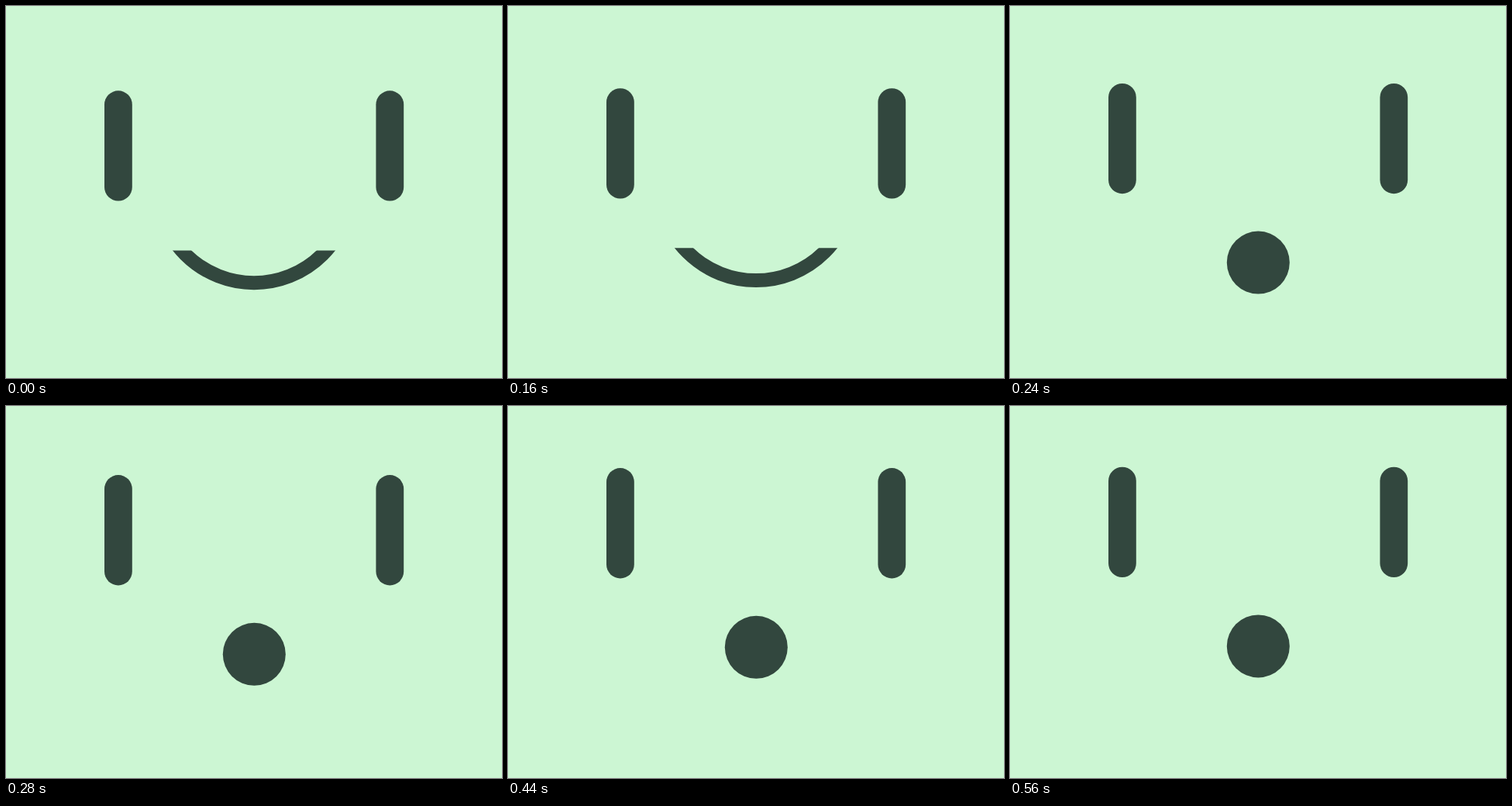
Write an HTML page that moves like this. It is 640 by 480 pixels and loops after 8 s.

```html
<!DOCTYPE html>
<html lang="en">
<head>
<meta charset="utf-8">
<title>Surprised face</title>
<style>
  html, body { margin: 0; height: 100%; overflow: hidden; background: #ccf6d3; }
  svg { display: block; width: 640px; height: 480px; fill: #32473e; }
</style>
</head>
<body>
<svg viewBox="0 0 640 480">
  <clipPath id="below"><rect x="160" y="284.8" width="320" height="100"/></clipPath>
  <g id="face">
    <rect x="127" y="78.7" width="35.8" height="142.3" rx="17.9"/>
    <rect x="477.4" y="78.7" width="35.8" height="142.3" rx="17.9"/>
    <g id="smile" clip-path="url(#below)">
      <circle cx="320" cy="201.6" r="125" fill="none" stroke="#32473e" stroke-width="18"/>
    </g>
    <circle id="gasp" cx="320.3" cy="309.9" r="40.5"/>
  </g>
</svg>
<script>
const LOOP = 8000, STEP = 40, GASP_AT = 240;
// Distance below the resting pose at each step: a steep ease in and a long ease out.
const drop = [30.6, 30.4, 30.1, 29.2, 27.5, 25.1, 21.2, 10.4, 5.6, 3.5, 2.2, 1.4, 0.8, 0.4, 0];
const [face, smile, gasp] = ['face', 'smile', 'gasp'].map(id => document.getElementById(id));

function draw(now) {
  const time = now % LOOP;
  const step = Math.min(Math.floor(time / STEP), drop.length - 1);
  const surprised = time >= GASP_AT;
  face.setAttribute('transform', `translate(0 ${drop[step]})`);
  smile.style.display = surprised ? 'none' : '';
  gasp.style.display = surprised ? '' : 'none';
}

const start = performance.now();
function tick() {
  draw(performance.now() - start);
  requestAnimationFrame(tick);
}
tick();
</script>
</body>
</html>
```
